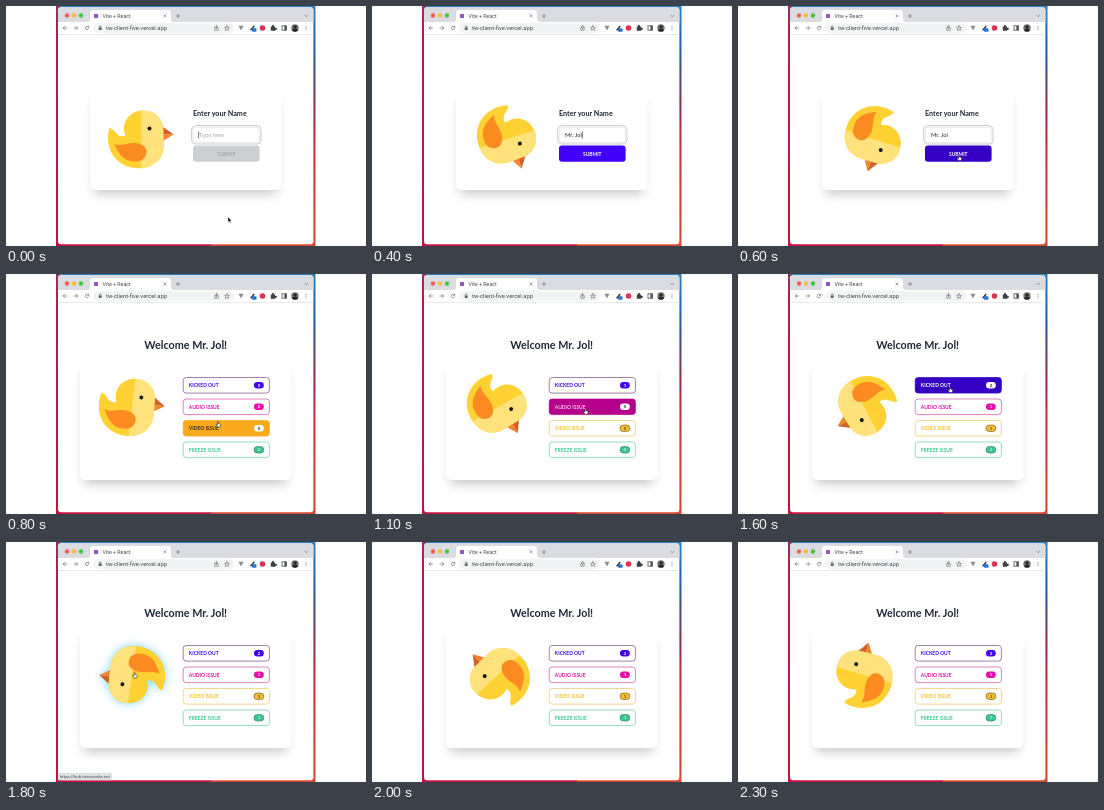
Recreate the animation shown at these times as an HTML page. Size 360 by 240 pixels, loop 2400 ms.

```html
<!DOCTYPE html>
<html lang="en">
<head>
<meta charset="utf-8">
<title>Issue counter</title>
<style>
  html, body { margin: 0; width: 100%; height: 100%; overflow: hidden; background: #fff; }
  svg { display: block; width: 360px; height: 240px; }
  text { font-family: Lato, "Open Sans", sans-serif; font-weight: 700; }
  .chrome text { font-family: Roboto, Inter, sans-serif; font-weight: 400; fill: #44474b; }
  .line { fill: none; stroke: #696c71; stroke-width: .65; stroke-linecap: round; stroke-linejoin: round; }
  .glow { filter: drop-shadow(0 0 5px #61cdfbcc); }
</style>
</head>
<body>
<svg viewBox="0 0 360 240">
  <defs>
    <linearGradient id="wallL" x2="0" y2="1">
      <stop offset="0" stop-color="#8a3468"/><stop offset=".1" stop-color="#b81c4c"/>
      <stop offset="1" stop-color="#c4123f"/>
    </linearGradient>
    <linearGradient id="wallR" x2="0" y2="1">
      <stop offset="0" stop-color="#2b7fc0"/><stop offset=".2" stop-color="#24609f"/>
      <stop offset=".42" stop-color="#8a3350"/><stop offset=".6" stop-color="#cc3040"/>
      <stop offset="1" stop-color="#d64a34"/>
    </linearGradient>
    <filter id="soft" x="-20%" y="-30%" width="140%" height="160%"><feGaussianBlur stdDeviation="5.5"/></filter>
    <clipPath id="face"><circle cx="289" cy="22" r="3.7"/></clipPath>
    <clipPath id="rightHalf"><rect x="0" y="-40" width="50" height="80"/></clipPath>
    <path id="bodyShape" d="M-32-11C-25-10-26-1-16-3C-21-16-12-28.5 2-28.5C14-28.5 22-20 22-9C22-3 22.5 0 22.5 6C22.5 20 12 29.3-3 29.3C-23 29.3-38 12-32-11Z"/>
    <path id="wingShape" d="M-27 5C-20 8-14 3.5-6 4C2 5 6 9 5 14C4 20 0 22.5-7 22.5C-18 22.5-23 14-27 5Z"/>
  </defs>

  <g class="chrome">
    <rect x="50" width="259.5" height="240" fill="url(#wallR)"/>
    <path d="M50 0h4v236h151v4H50z" fill="url(#wallL)"/>
    <rect x="52" y="1.3" width="255.4" height="236.9" rx="3" fill="#fff"/>
    <path d="M52 16V4.3a3 3 0 0 1 3-3h249.4a3 3 0 0 1 3 3V16z" fill="#dadce1"/>
    <circle cx="61" cy="9.5" r="2.2" fill="#f35f57"/>
    <circle cx="68" cy="9.5" r="2.2" fill="#f6bd3a"/>
    <circle cx="75" cy="9.5" r="2.2" fill="#43c645"/>
    <path d="M81 16q3 0 3-3V7q0-3 3-3h75q3 0 3 3v6q0 3 3 3z" fill="#fff"/>
    <rect x="88" y="8" width="4" height="4" fill="#9257c4"/>
    <text x="96.5" y="11.9" font-size="5.3">Vite + React</text>
    <path class="line" d="M157.9 8.8l2.2 2.2m0-2.2l-2.2 2.2M170.3 10h3.4m-1.7-1.7v3.4M298.8 9.3l1.4 1.4 1.4-1.4"/>
    <path class="line" d="M60.7 22h-3.6m1.7-1.7l-1.7 1.7 1.7 1.7M68 22h3.6m-1.7-1.7l1.7 1.7-1.7 1.7M82.6 21a1.8 1.8 0 1 0 .1 1.8m.1-2.7v1.2h-1.3"/>
    <rect x="87" y="17.2" width="141" height="9.8" rx="4.9" fill="#f1f3f4"/>
    <rect x="92.8" y="21.5" width="2.8" height="2.5" rx=".4" fill="#5c5f64"/>
    <path class="line" d="M93.3 21.5v-.7a.9.9 0 0 1 1.8 0v.7"/>
    <text x="100" y="24.1" font-size="5.85">tw-client-five.vercel.app</text>
    <path class="line" d="M209.5 21.3h-.7v2.9h3.4v-2.9h-.7M210.5 22.7v-3.1m-.8.8l.8-.8.8.8"/>
    <path class="line" d="M221 19.8l.7 1.5 1.7.2-1.3 1.1.4 1.7-1.5-.8-1.5.8.4-1.7-1.3-1.1 1.7-.2z"/>
    <path d="M232.4 19.8h5.2L235 24.6z" fill="#8a9097"/>
    <path d="M244 24l3.6-4.6 1.2 1-3.6 4.3z" fill="#33363a"/>
    <rect x="246" y="22.2" width="4.5" height="3.6" rx=".8" fill="#2374d4"/>
    <circle cx="256.5" cy="22" r="2.8" fill="#e0304f"/>
    <path d="M264.8 20.6h1.3a1.1 1.1 0 1 1 1.8 0h1.3v1.3a1.1 1.1 0 1 1 0 1.8v1h-4.4z" fill="#3c4043"/>
    <rect x="276" y="19.8" width="4.4" height="4.4" fill="none" stroke="#4b4e52" stroke-width=".8"/>
    <rect x="278.4" y="19.8" width="2" height="4.4" fill="#4b4e52"/>
    <g clip-path="url(#face)">
      <rect x="285" y="18" width="8" height="8" fill="#77736f"/>
      <circle cx="289" cy="21" r="1.7" fill="#292728"/>
      <ellipse cx="289" cy="25.5" rx="3.2" ry="2.8" fill="#292728"/>
    </g>
    <g fill="#696c71"><circle cx="300" cy="20.3" r=".5"/><circle cx="300" cy="22" r=".5"/><circle cx="300" cy="23.7" r=".5"/></g>
    <path d="M52 28.5h255.4" stroke="#dfe1e4" stroke-width=".7"/>
  </g>

  <g id="login">
    <rect x="88" y="95" width="183" height="93" fill="#000" opacity=".21" filter="url(#soft)"/>
    <rect x="84" y="84" width="191.5" height="100" rx="5" fill="#fff"/>
    <text x="187" y="110" font-size="7.2" fill="#1f2937">Enter your Name</text>
    <rect x="185.6" y="119.6" width="69.4" height="18.4" rx="4" fill="none" stroke="#c4c7cc" stroke-width=".9"/>
    <rect x="187.2" y="121.2" width="66.2" height="15.2" rx="3" fill="#fff" stroke="#d9dbdf" stroke-width=".6"/>
    <text id="entry" x="193" y="131" font-size="5.8" style="font-weight:400"/>
    <path id="caret" d="M0 125.5v7" stroke="#1f2937" stroke-width=".6"/>
    <rect id="submit" x="187" y="139.6" width="66.6" height="16.2" rx="3"/>
    <text id="submitText" x="220.3" y="149.6" font-size="4.9" text-anchor="middle">SUBMIT</text>
  </g>

  <g id="welcome">
    <rect x="78" y="97" width="203" height="113" fill="#000" opacity=".21" filter="url(#soft)"/>
    <rect x="74" y="85" width="211.5" height="121" rx="5" fill="#fff"/>
    <text x="179.7" y="74.5" font-size="10.8" fill="#1f2937" text-anchor="middle">Welcome Mr. Jol!</text>
    <g id="buttons"></g>
  </g>

  <g id="duckGlow"><g id="duck">
    <path d="M21-12.5L32.5-4.5H21z" fill="#cf6228"/>
    <path d="M21-4.5H32.5L21 2.5z" fill="#f0842c"/>
    <use href="#bodyShape" fill="#ffd132"/>
    <use href="#bodyShape" fill="#ffe27c" clip-path="url(#rightHalf)"/>
    <use href="#wingShape" fill="#fb8a20"/>
    <circle cx="8.2" cy="-10.5" r="2" fill="#17181c"/>
  </g></g>

  <g id="status" class="chrome">
    <path d="M52 231h52q2 0 2 2v5.2H52z" fill="#dee1e6"/>
    <text x="54" y="236.2" font-size="4.3">https://hub.tutorworks.net</text>
  </g>

  <g id="cursor" stroke-linejoin="round">
    <path id="arrow" d="M0 0v5.2l1.2-1.1.9 2 .9-.4-.9-1.9h1.6z" fill="#000" stroke="#fff" stroke-width=".4"/>
    <path id="hand" transform="scale(.85)" d="M-.6.2Q0-.7.6.2V2.4l2.2.6Q3.4 3.3 3.2 4.2L2.6 6.4H-.8L-2.4 3.8Q-2.2 2.9-1.4 3.4L-.6 4z" fill="#fff" stroke="#222" stroke-width=".7"/>
  </g>
</svg>
<script>
const STEP = 100, STEPS = 24, WELCOME = 8;
const $ = id => document.getElementById(id);
const show = (el, on) => el.setAttribute('display', on ? 'inline' : 'none');
const set = (el, attrs) => { for (const k in attrs) el.setAttribute(k, attrs[k]); };

function add(parent, tag, attrs, text = '') {
  const el = document.createElementNS('http://www.w3.org/2000/svg', tag);
  set(el, attrs);
  el.textContent = text;
  return parent.appendChild(el);
}

// bumps: steps at which the counter goes up
const issues = [
  { label: 'KICKED OUT', color: '#4406e8', border: '#7f4a80', hover: '#3600c4', ink: '#fff', rim: 'none', num: '#fff', bumps: [10, 16] },
  { label: 'AUDIO ISSUE', color: '#e80aa9', border: '#cf4f9f', hover: '#b4008a', ink: '#f6cdea', rim: 'none', num: '#fff', bumps: [13] },
  { label: 'VIDEO ISSUE', color: '#f5bd35', border: '#ecc75f', hover: '#f9a91c', ink: '#3a2b10', rim: '#80601f', num: '#6a480c', bumps: [14] },
  { label: 'FREEZE ISSUE', color: '#3cc791', border: '#66cfa6', hover: '#34cb89', ink: '#0d2a20', rim: '#38896a', num: '#cdeee0', bumps: [15] }
];

issues.forEach((b, i) => {
  const y = 111.3 + i * 21.5;
  b.g = add($('buttons'), 'g', {});
  b.y = y;
  b.box = add(b.g, 'rect', { x: 177.2, y: y - 7.8, width: 86.2, height: 15.6, rx: 3, 'stroke-width': .7 });
  b.text = add(b.g, 'text', { x: 182.8, y: y + 1.8, 'font-size': 4.95 }, b.label);
  b.pill = add(b.g, 'rect', { x: 248, y: y - 3.2, width: 9.8, height: 6.4, rx: 3.2, 'stroke-width': .7 });
  b.count = add(b.g, 'text', { x: 252.9, y: y + 1.6, 'font-size': 4.4, 'text-anchor': 'middle' });
});

function paintButton(b, step, hovered, pressed) {
  set(b.box, { fill: hovered ? b.hover : '#fff', stroke: hovered ? b.hover : b.border });
  set(b.text, { fill: hovered ? b.ink : b.color });
  set(b.pill, { fill: hovered ? '#fff' : b.color, stroke: hovered ? 'none' : b.rim });
  set(b.count, { fill: hovered ? '#222' : b.num });
  b.count.textContent = b.bumps.filter(s => step >= s).length;
  const k = pressed ? .955 : 1;
  b.g.setAttribute('transform', `translate(${220.3 * (1 - k)} ${b.y * (1 - k)}) scale(${k})`);
}

// step, x, y, shape; missing steps hide the pointer
const pointer = [
  [0, 222, 211, 'arrow'], [5, 226, 176, 'arrow'], [6, 221, 149, 'hand'], [7, 220, 149, 'hand'],
  [8, 212, 147.5, 'hand'], [9, 213, 112, 'hand'], [10, 213, 112, 'hand'], [11, 213.5, 134.7, 'hand'],
  [12, 214, 135, 'hand'], [13, 217, 156, 'hand'], [14, 221, 179, 'hand'], [15, 220, 177, 'hand'],
  [16, 212, 113, 'hand'], [17, 134, 131, 'hand'], [18, 128.5, 130.5, 'hand'], [19, 128.5, 130.5, 'hand']
];
const typed = ['', 'M', 'Mr.', 'Mr. J', 'Mr. Jol'];
const onDuck = [17, 18, 19];

function duckAngle(step) {
  if (step < WELCOME) return step * 18;
  return 6.5 + (step - WELCOME) * 18.15 + Math.max(0, step - 18) * 1.5;
}

function draw(step) {
  const inside = step >= WELCOME;
  show($('login'), !inside);
  show($('welcome'), inside);

  const name = typed[Math.min(step, typed.length - 1)];
  const entry = $('entry');
  entry.textContent = name || 'Type here';
  set(entry, { fill: name ? '#1f2937' : '#a5a9b1' });
  if (!inside) {
    const x = name ? 193.5 + entry.getComputedTextLength() : 192.6;
    $('caret').setAttribute('transform', `translate(${x} 0)`);
  }
  show($('caret'), step < 6);
  const over = step === 6 || step === 7;
  set($('submit'), { fill: !name ? '#cdcfd3' : over ? '#3600c4' : '#4200f8' });
  set($('submitText'), { fill: name ? '#fff' : '#a0a3a9' });

  const at = pointer.find(p => p[0] === step);
  show($('cursor'), !!at);
  if (at) {
    $('cursor').setAttribute('transform', `translate(${at[1]} ${at[2]})`);
    show($('arrow'), at[3] === 'arrow');
    show($('hand'), at[3] === 'hand');
  }

  issues.forEach(b => {
    const hovered = inside && !!at && at[1] > 177 && Math.abs(at[2] - b.y) < 11;
    paintButton(b, step, hovered, hovered && b.bumps.includes(step + 1));
  });

  const hot = onDuck.includes(step);
  $('duckGlow').setAttribute('class', hot ? 'glow' : '');
  show($('status'), hot);
  $('duck').setAttribute('transform', `translate(${inside ? 126 : 135.3} 133) rotate(${duckAngle(step)})`);
}

const start = performance.now();
let last = -1;
function tick() {
  const step = Math.floor((performance.now() - start) / STEP) % STEPS;
  if (step !== last) draw(last = step);
  requestAnimationFrame(tick);
}
tick();
</script>
</body>
</html>
```
